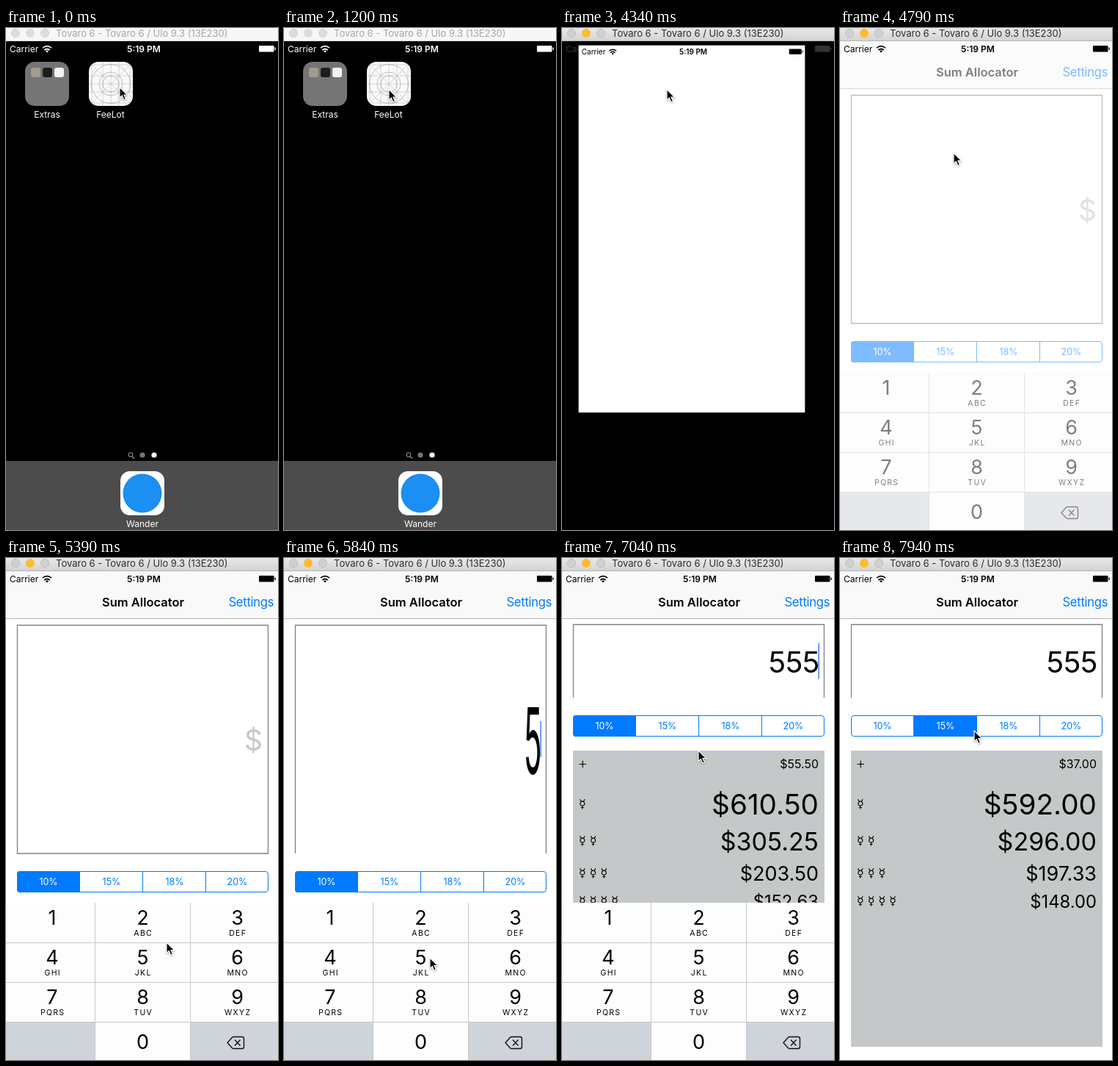
These frames come from a looping animation (371x683 px, 8000 ms). An HTML page:

```html
<!DOCTYPE html>
<html lang="en">
<head>
<meta charset="utf-8">
<title>Sum Allocator</title>
<style>
html, body { margin: 0; width: 100%; height: 100%; overflow: hidden; background: #000; }
svg { display: block; width: 100%; height: 100%; }
text { font-family: Inter, Roboto, sans-serif; white-space: pre; }
.sign { font-family: "DejaVu Sans", sans-serif; }
.pointer { filter: drop-shadow(0 1px 1px rgba(0, 0, 0, .35)); }
</style>
</head>
<body>
<svg id="stage" viewBox="0 0 371 683"></svg>
<script>
const LOOP = 8000, BLUE = '#007aff';
const stage = document.getElementById('stage');

const clamp = v => Math.max(0, Math.min(1, v));
const lerp = (a, b, k) => a + (b - a) * k;
const rect = (x, y, w, h, fill, more = '') =>
  `<rect x="${x}" y="${y}" width="${w}" height="${h}" fill="${fill}" ${more}/>`;
const circle = (x, y, r, fill, more = '') => `<circle cx="${x}" cy="${y}" r="${r}" fill="${fill}" ${more}/>`;
const path = (d, stroke, width = 1, fill = 'none') =>
  `<path d="${d}" fill="${fill}" stroke="${stroke}" stroke-width="${width}"/>`;
const text = (x, y, size, str, fill = '#000', anchor = 'start', more = '') =>
  `<text x="${x}" y="${y}" font-size="${size}" fill="${fill}" text-anchor="${anchor}" ${more}>${str}</text>`;
const group = (attrs, ...parts) => `<g ${attrs}>${parts.join('')}</g>`;

// Pointer keys: time, x, y
const PATH = [
  [0, 155, 80.5], [150, 154, 88], [300, 150, 106], [450, 147, 119], [600, 143, 113], [750, 140, 99],
  [900, 139, 89], [1050, 142, 85], [1200, 143, 83.5], [4640, 143, 83.5], [4790, 155, 170], [4940, 185, 350],
  [5090, 212, 482], [5240, 218, 518], [5390, 219, 523], [5690, 199, 544], [6590, 199, 544],
  [6740, 197, 480], [6890, 192, 360], [7040, 186, 262], [7190, 183, 235], [8000, 183, 235]
];

function pointer(t) {
  const i = PATH.findIndex((key, n) => n && t <= key[0]);
  const [t0, x0, y0] = PATH[i - 1], [t1, x1, y1] = PATH[i], k = (t - t0) / (t1 - t0);
  return group(`class="pointer" transform="translate(${lerp(x0, x1, k)} ${lerp(y0, y1, k)})"`,
    path('M0 0V14.6L3.3 11.6 5.8 17.2 8.4 16.1 6 10.7H10.6Z', '#fff', 1.2, '#000'));
}

function titleBar(active) {
  const dot = (x, fill) => circle(x, 7, 5.6, fill, `stroke="${active ? '#b9b9b9' : '#d0d0d0'}" stroke-width=".8"`);
  const grey = active ? '#d0d0d0' : '#dcdcdc';
  return rect(0, 0, 371, 18, active ? 'url(#bar)' : '#f7f7f7') +
    rect(0, 17, 371, 1, active ? '#b4b4b4' : '#dedede') +
    dot(13, grey) + circle(33, 7, 6, active ? '#fdbc2e' : grey) + dot(53, grey) +
    text(68, 12, 13, 'Tovaro 6 - Tovaro 6 / Ulo 9.3 (13E230)', active ? '#2c2c2c' : '#a6a6a6');
}

const statusBar = c =>
  text(5, 32.5, 12, 'Carrier', c) +
  path('M50 27.2Q56 22.2 62 27.2M52.3 30Q56 27 59.7 30', c, 1.7) +
  `<path d="M54 31.3Q56 29.8 58 31.3L56 33.5Z" fill="${c}"/>` +
  text(188, 32.5, 12, '5:19 PM', c, 'middle', 'font-weight="600"') +
  rect(345, 24, 20.5, 8.5, c, 'rx="1.2"') + rect(366.5, 26.5, 1.3, 3.5, c);

function gridIcon() {
  let d = 'M113 46L173 106M173 46L113 106';
  for (const o of [-26, -11, 0, 11, 26]) d += `M${143 + o} 46V106M113 ${76 + o}H173`;
  const ring = r => circle(143, 76, r, 'none', 'stroke="#a5a5a5" stroke-width=".7"');
  return rect(113, 46, 60, 60, '#f9f9f9', 'rx="13"') +
    group('clip-path="url(#tile)"', path(d, '#bcbcbc', .6), ring(26.5), ring(16), ring(11));
}

const homeIcons = () =>
  rect(26, 46, 60, 60, '#757575', 'rx="13"') +
  ['#a39a90', '#1d1d1d', '#f4f4f4'].map((c, i) => rect(34 + 16 * i, 54, 13, 13, c, 'rx="3"')).join('') +
  text(56, 122, 12, 'Extras', '#fff', 'middle') +
  gridIcon() + text(142.5, 122, 12, 'FeeLot', '#fff', 'middle') +
  circle(170, 580.5, 2.8, 'none', 'stroke="#8c8c8c" stroke-width="1.1"') + path('M172 583L175 586', '#8c8c8c', 1.2) +
  circle(186, 581, 3.6, '#757575') + circle(202, 581, 3.6, '#fff') +
  rect(0, 589, 371, 94, '#4c4c4c') + rect(156, 603, 60, 60, '#fff', 'rx="13"') +
  circle(186, 633, 26.5, '#1b8ff2') + text(186, 679, 12, 'Wander', '#fff', 'middle');

function segments(y, chosen, pressed) {
  const xs = [15, 101, 187, 273, 358];
  let out = '';
  ['10%', '15%', '18%', '20%'].forEach((label, i) => {
    const on = i === chosen, w = xs[i + 1] - xs[i];
    if (on || pressed === i) out += rect(xs[i], y, w, 29, BLUE, on ? '' : 'fill-opacity=".18"');
    out += text(xs[i] + w / 2, y + 18.5, 12.5, label, on ? '#fff' : BLUE, 'middle');
  });
  return `<clipPath id="pill">${rect(15, y, 343, 29, '#000', 'rx="4"')}</clipPath>` +
    group('clip-path="url(#pill)"', out) +
    rect(15.5, y + .5, 342, 28, 'none', `rx="3.5" stroke="${BLUE}"`) +
    path(xs.slice(1, 4).map(x => `M${x - .5} ${y}v29`).join(''), BLUE);
}

function results(y, bill, rate) {
  const tip = bill / rate, money = v => '$' + v.toFixed(2);
  const sum = (dy, size, v) => text(350, y + dy, size, money(v), '#000', 'end');
  let out = rect(15, y, 343, 403, '#c5c8c9') + path(`M23.5 ${y + 18.5}h9.5m-4.75 -4.75v9.5`, '#000', 1.1) +
    sum(24, 16, tip);
  [[87, 38.7], [136, 34], [177, 27], [214, 23.8]].forEach(([dy, size], row) => {
    out += sum(dy, size, (bill + tip) / (row + 1));
    const sy = y + [78, 128, 172, 210][row];
    for (let i = 0; i <= row; i++) out += text(28 + 14.8 * i, sy, 16.5, '\u263F', '#000', 'middle', 'class="sign"');
  });
  return out;
}

function keyboard(down, pressed) {
  const letters = ['', 'ABC', 'DEF', 'GHI', 'JKL', 'MNO', 'PQRS', 'TUV', 'WXYZ'], cols = [63, 186.5, 315.5];
  let out = rect(0, 469, 371, 214, '#fdfdfd') +
    rect(0, 631, 122, 52, '#cfd3da') + rect(251, 631, 120, 52, '#cfd3da');
  if (pressed) out += rect(122, 524, 129, 53, '#cfd3da');
  letters.forEach((str, i) => {
    const x = cols[i % 3], y = 498.5 + 54 * Math.floor(i / 3);
    out += text(x, y, 27, i + 1, '#000', 'middle') +
      text(x + .7, y + 15.5, 10.5, str, '#000', 'middle', 'letter-spacing="1.3"');
  });
  out += text(186.5, 668, 27, 0, '#000', 'middle') +
    path('M0 523.5H371M0 577.5H371M0 631.5H371M121.5 469V683M251.5 469V683', '#c6c8cb') +
    path('M302 659.5L308.5 652.3Q309.3 651.5 310.5 651.5H322Q324.5 651.5 324.5 654V665Q324.5 667.5 322 667.5H310.5Q309.3 667.5 308.5 666.7ZM312 655.5L319.5 663.5M319.5 655.5L312 663.5', '#111', 1.4);
  return group(`transform="translate(0 ${down})"`, out);
}

function calculator(t) {
  const u = clamp((t - 5860) / 478), k = u * u * (3 - 2 * u);
  const height = lerp(311, 100, k), bottom = 91 + height - k, mid = bottom - height / 2;
  const typed = t < 5840 ? '' : t < 6140 ? '5' : t < 6440 ? '55' : '555';
  const chosen = t >= 7790 ? 1 : 0;
  const caret = t >= 5540 && t < 7340 || t >= 7490 && t < 7790;
  const top = 91.5 - k;
  let out = rect(0, 18, 371, 665, '#fff') + rect(0, 18, 371, 64, '#f9f9f9') + rect(0, 82, 371, 1, '#b5b5b5') +
    statusBar('#000') +
    text(187, 66, 16.5, 'Sum Allocator', '#000', 'middle', 'font-weight="600"') +
    text(365.3, 66, 16.7, 'Settings', BLUE, 'end', 'letter-spacing="-.3"') +
    path(`M15.5 ${bottom}V${top}H357.5V${bottom}${typed ? '' : 'Z'}`, '#7f7f7f', 1.3);
  out += typed
    ? group(`transform="translate(351 ${mid + .5}) scale(1 ${height / 100})"`,
        text(0, 15.2, 40, typed, '#000', 'end', 'letter-spacing="-.6"'))
    : text(350, mid + 15, 39, '$', '#c7c7cc', 'end');
  if (caret) out += rect(349.5, mid - 24.5, 1.5, 49, '#4a7df0');
  out += segments(Math.round(bottom + 24), chosen, t >= 7490 && t < 7790 ? 1 : -1);
  if (typed) out += results(Math.round(bottom + 72), +typed, chosen ? 15 : 10);
  if (t < 7940) out += keyboard(t < 7790 ? 0 : 120, t === 5690);
  return out;
}

function launch(t) {
  const p = 1 - (1 - clamp((t - 4130) / 506)) ** 3;
  const x = lerp(113, 0, p), y = lerp(46, 18, p), w = lerp(60, 371, p), h = lerp(60, 665, p ** 1.43);
  const zoom = w / 60, scale = w / 371;
  let out = '';
  if (p < 1) {
    out += group(`opacity="${clamp(1 - p * 1.3)}" transform="translate(${x} ${y}) scale(${zoom}) translate(-113 -46)"`,
      homeIcons()) + group(`opacity="${1 - p}"`, statusBar('#fff'));
  }
  if (p > 0) {
    out += group(`opacity="${clamp(p * 2.5)}"`, rect(x, y, w, h, '#fff'),
      group(`transform="translate(${x} ${y}) scale(${scale}) translate(0 -18)"`, statusBar('#000')));
  }
  return out;
}

const DEFS = `<defs>
  <linearGradient id="bar" x2="0" y2="1"><stop stop-color="#e9e9e9"/><stop offset="1" stop-color="#d2d2d2"/></linearGradient>
  <clipPath id="tile"><rect x="113" y="46" width="60" height="60" rx="13"/></clipPath>
</defs>`;

function draw(t) {
  let screen = rect(0, 0, 371, 683, '#000');
  if (t < 4940) screen += launch(t);
  if (t >= 4790) screen += group(`opacity="${t < 4940 ? .5 : 1}"`, calculator(t));
  stage.innerHTML = DEFS + screen + titleBar(t >= 4050) + pointer(t);
}

const step = t => t < 4190 ? Math.floor(t / 150) * 150 : 4190 + Math.floor((t - 4190) / 150) * 150;

const start = performance.now();
let shown = -1;
function tick(now) {
  const t = step(Math.max(0, now - start) % LOOP);
  if (t !== shown) draw(shown = t);
  requestAnimationFrame(tick);
}
tick(start);
</script>
</body>
</html>
```
